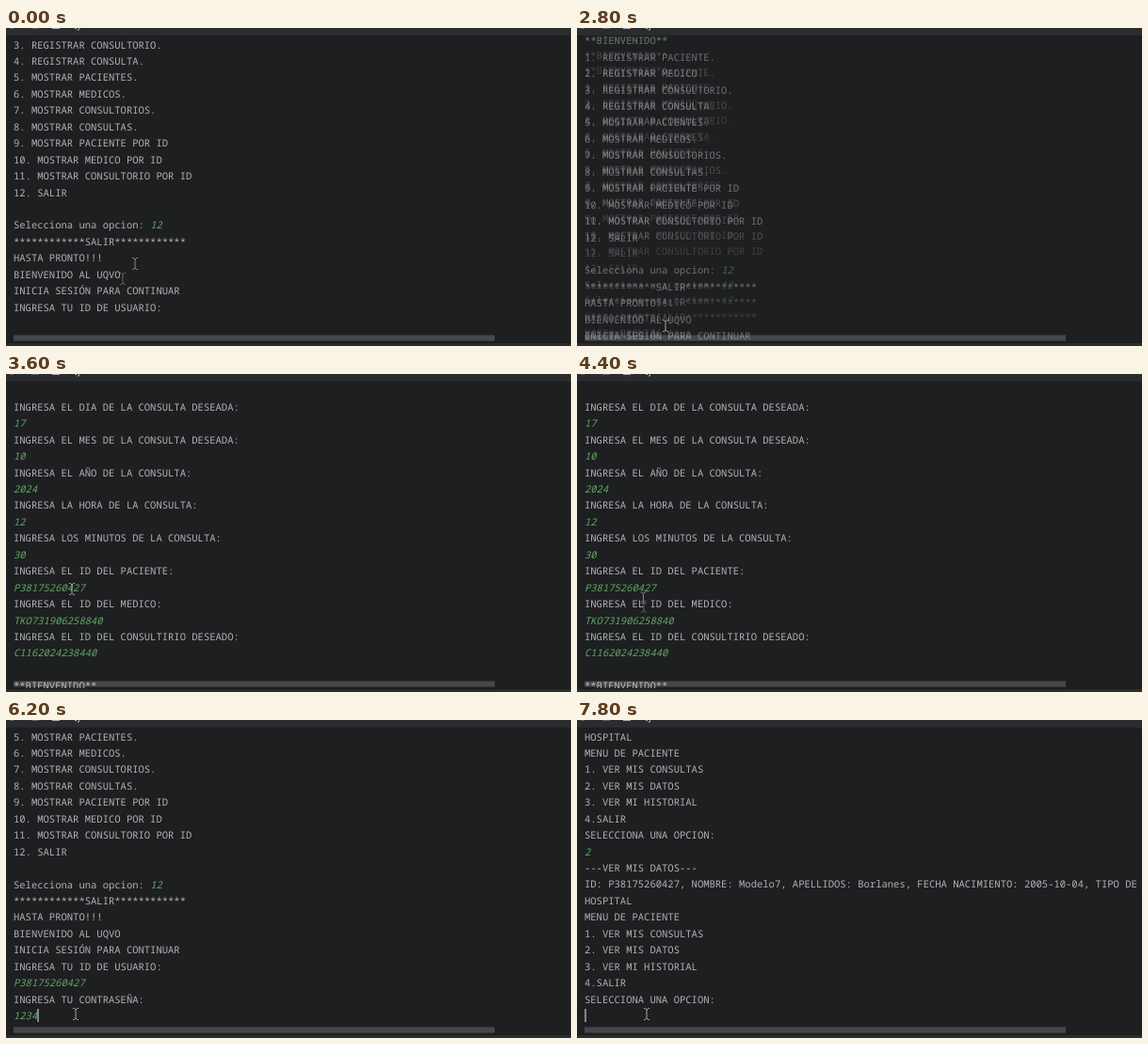
These frames come from a looping animation (600 px wide and 338 px high, 8 s). An HTML page:

```html
<!DOCTYPE html>
<html lang="es">
<head>
<meta charset="utf-8">
<title>Consola</title>
<style>
  html, body { margin: 0; width: 100%; height: 100%; overflow: hidden; background: #1e1f21; }
  #stage { position: relative; width: 600px; height: 338px; overflow: hidden; }
  #stage div, #stage svg { position: absolute; }
  #toolbar { left: 0; top: 0; width: 600px; height: 8px; background: #2a2c2e; border-bottom: 1px solid #1c1d1f; }
  #toolbar svg { left: 0; top: 0; }
  #console {
    left: 0; top: 9px; width: 600px; height: 325px; overflow: hidden;
    font: 500 10.52px/17.44px "Noto Sans Mono", "DejaVu Sans Mono", monospace;
    text-rendering: geometricPrecision; color: #b0b2b5;
  }
  .log { left: 8px; top: 0; white-space: pre; }
  #stage .log div { position: static; height: 17.44px; }
  .log i { color: #5fa862; }
  #caret { top: 298px; width: 2px; height: 14px; background: #85878a; }
  #scrollbar {
    left: 8px; top: 326px; width: 511px; height: 5px;
    border: solid rgba(255, 255, 255, .1); border-width: 1px 0;
    background: rgba(255, 255, 255, .18) padding-box;
  }
  #footer { left: 0; top: 334px; width: 600px; height: 4px; box-sizing: border-box; background: #2a2c2e; border-top: 1px solid #1c1d1f; }
  .pointer { left: -4px; top: -6.5px; fill: none; stroke: #a4a4a4; stroke-width: 1; }
</style>
</head>
<body>
<div id="stage">
  <div id="toolbar">
    <svg width="90" height="4">
      <path d="M4 .5h4M27 .5h8" stroke="#5a5c60"/>
      <path d="M49 .5h8M73 .5h2M77.5 0v2h-2" stroke="#a9abb0" fill="none"/>
    </svg>
  </div>
  <div id="console"><div id="caret"></div></div>
  <div id="scrollbar"></div>
  <div id="footer"></div>
</div>
<script>
const LOOP = 8000, BLINK = 240, LINE = 17.44, CARET_ROW_TOP = 298.1;
const GHOST_STEP = 25, GHOST_ALPHA = [.55, .3, .22];

// Text after "|" is what the user typed.
const patientMenu = `HOSPITAL
MENU DE PACIENTE
1. VER MIS CONSULTAS
2. VER MIS DATOS
3. VER MI HISTORIAL
4.SALIR
SELECCIONA UNA OPCION:`;

const transcript = `
INGRESA EL DIA DE LA CONSULTA DESEADA:
|17
INGRESA EL MES DE LA CONSULTA DESEADA:
|10
INGRESA EL AÑO DE LA CONSULTA:
|2024
INGRESA LA HORA DE LA CONSULTA:
|12
INGRESA LOS MINUTOS DE LA CONSULTA:
|30
INGRESA EL ID DEL PACIENTE:
|P38175260427
INGRESA EL ID DEL MEDICO:
|TKO731906258840
INGRESA EL ID DEL CONSULTIRIO DESEADO:
|C1162024238440

**BIENVENIDO**
1. REGISTRAR PACIENTE.
2. REGISTRAR MEDICO.
3. REGISTRAR CONSULTORIO.
4. REGISTRAR CONSULTA.
5. MOSTRAR PACIENTES.
6. MOSTRAR MEDICOS.
7. MOSTRAR CONSULTORIOS.
8. MOSTRAR CONSULTAS.
9. MOSTRAR PACIENTE POR ID
10. MOSTRAR MEDICO POR ID
11. MOSTRAR CONSULTORIO POR ID
12. SALIR

Selecciona una opcion: |12
************SALIR************
HASTA PRONTO!!!
BIENVENIDO AL UQVO
INICIA SESIÓN PARA CONTINUAR
INGRESA TU ID DE USUARIO:
|P38175260427
INGRESA TU CONTRASEÑA:
|1234
${patientMenu}
|2
---VER MIS DATOS---
ID: P38175260427, NOMBRE: Modelo7, APELLIDOS: Borlanes, FECHA NACIMIENTO: 2005-10-04, TIPO DE
${patientMenu}
|`.split("\n").map(line => line.split("|"));

const idRow = transcript.findIndex(([text]) => text === "INGRESA TU ID DE USUARIO:") + 1;
const passwordRow = idRow + 2, optionRow = passwordRow + 8, lastRow = transcript.length - 1;

// Start time, prompt row, characters typed in it; each entry restarts the blink.
const prompts = [
  [-BLINK, idRow, 0], [5500, idRow, 12],
  [5600, passwordRow, 0], [5900, passwordRow, 1], [6000, passwordRow, 2],
  [6100, passwordRow, 3], [6200, passwordRow, 4],
  [6320, optionRow, 0], [7500, optionRow, 1], [7700, lastRow, 0]
];
const scrollKeys = [[0, 0], [2725, 0], [3200, 304], [3450, 366], [4480, 366], [4650, 270], [4950, 30], [5020, 0]];
const pointerKeys = [
  [0, 137, 250], [50, 124, 266], [350, 86, 302], [800, 70, 304], [1200, 70, 304],
  [1300, 64, 310], [1500, 66, 313], [1700, 66, 313], [2200, 94, 316],
  [3150, 94, 316], [3500, 70, 228], [4350, 70, 228], [4800, 74, 312]
];

function sample(keys, t) {
  const next = keys.findIndex(key => key[0] > t);
  if (next < 0) return keys[keys.length - 1].slice(1);
  const [from, to] = [keys[next - 1], keys[next]];
  const k = (t - from[0]) / (to[0] - from[0]);
  return from.slice(1).map((v, i) => v + (to[i + 1] - v) * k);
}

const stage = document.getElementById("stage");
const consoleBox = document.getElementById("console");
const caret = document.getElementById("caret");

const logs = GHOST_ALPHA.map((alpha, n) => {
  const log = document.createElement("div");
  log.className = "log";
  if (n) log.setAttribute("aria-hidden", "true");
  for (const [text, input] of transcript) {
    const row = document.createElement("div");
    row.append(text);
    if (input !== undefined) row.appendChild(document.createElement("i")).textContent = input;
    log.append(row);
  }
  consoleBox.append(log);
  return log;
});

const pointers = [0, 1].map(() => {
  stage.insertAdjacentHTML("beforeend",
    `<svg class="pointer" width="8" height="13"><path d="M1 .5H2.5L4 2 5.5 .5H7M4 2V11M1 12.5H2.5L4 11 5.5 12.5H7"/></svg>`);
  return stage.lastElementChild;
});

let shownPrompt;
function showPrompt(prompt) {
  if (prompt === shownPrompt) return;
  shownPrompt = prompt;
  const [, promptRow, typed] = prompt;
  for (const log of logs) {
    [...log.children].forEach((row, i) => {
      row.hidden = i > promptRow;
      const input = row.querySelector("i");
      if (input) input.textContent = i === promptRow ? transcript[i][1].slice(0, typed) : transcript[i][1];
    });
  }
  caret.style.left = `calc(8px + ${typed}ch)`;
}

function render(t) {
  const prompt = prompts.filter(p => p[0] <= t).pop();
  showPrompt(prompt);

  const [scroll] = sample(scrollKeys, t);
  const scrolling = scroll !== sample(scrollKeys, t + 2 * GHOST_STEP)[0];
  logs.forEach((log, n) => {
    const [offset] = sample(scrollKeys, t + n * GHOST_STEP);
    const y = CARET_ROW_TOP - prompt[1] * LINE + offset;
    log.style.top = `${y}px`;
    log.style.opacity = scrolling ? GHOST_ALPHA[n] : n ? 0 : 1;
  });

  const blinkOn = Math.floor((t - prompt[0]) / BLINK) % 2 === 0;
  caret.style.opacity = blinkOn ? 1 : 0;
  caret.style.transform = `translateY(${scroll}px)`;

  const here = sample(pointerKeys, t), ahead = sample(pointerKeys, t + 50);
  const distance = Math.hypot(ahead[0] - here[0], ahead[1] - here[1]);
  [here, ahead].forEach(([x, y], n) => {
    pointers[n].style.transform = `translate(${x}px, ${y}px)`;
    pointers[n].style.opacity = distance > 2 ? [.8, .55][n] : 1 - n;
  });
}

let start;
function tick(now) {
  start ??= now;
  render(Math.max(0, now - start) % LOOP);
  requestAnimationFrame(tick);
}
render(0);
requestAnimationFrame(tick);
</script>
</body>
</html>
```
